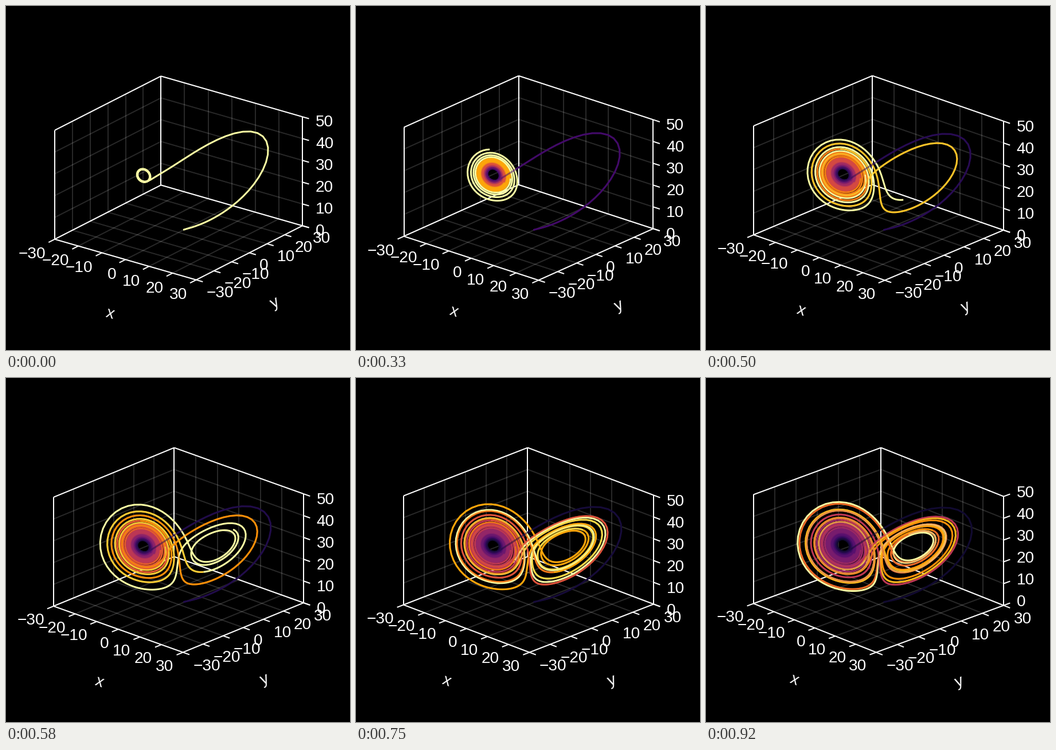
These frames come from a looping animation (600 px wide and 600 px high, 1000 ms). A matplotlib script:

```python
import numpy as np
import matplotlib.pyplot as plt
from matplotlib.animation import FuncAnimation
from matplotlib.collections import LineCollection

SIZE, DPI = 600, 100
PX = 72 / DPI  # points per pixel
LOOP_MS, TICK_MS = 1000, 10
TICKS = LOOP_MS // TICK_MS
POSES, STEPS = 12, 250
ELEVATION = np.pi / 8
SCALE = 0.9 * 2 * 268 / np.sqrt(1 + 1 + 4 / 9)
CENTER = np.array([301.0, 300.0])
XY_TICKS = range(-30, 31, 10)
Z_TICKS = range(0, 51, 10)
FONT = dict(family="Liberation Sans", size=28 * PX, color="white")
INFERNO = plt.get_cmap("inferno")


def lorenz_velocity(p, sigma=10, rho=28, beta=8 / 3):
    x, y, z = p
    return np.array([sigma * (y - x), x * (rho - z) - y, x * y - beta * z])


def lorenz(count, dt=0.01):
    """Runge-Kutta integration from (1, 1, 1)."""
    p = np.ones(3)
    points = []
    for _ in range(count):
        k1 = lorenz_velocity(p)
        k2 = lorenz_velocity(p + dt / 2 * k1)
        k3 = lorenz_velocity(p + dt / 2 * k2)
        k4 = lorenz_velocity(p + dt * k3)
        p = p + dt / 6 * (k1 + 2 * k2 + 2 * k3 + k4)
        points.append(p)
    return np.array(points)


def project(points, azimuth):
    """Orthographic view of the data box, in pixels with y pointing down."""
    p = np.asarray(points, float)
    x, y, z = p[..., 0] / 60, p[..., 1] / 60, (p[..., 2] - 25) / 75
    sin, cos = np.sin(azimuth), np.cos(azimuth)
    right = cos * y - sin * x
    up = np.cos(ELEVATION) * z - np.sin(ELEVATION) * (cos * x + sin * y)
    return CENTER + SCALE * np.stack([right, -up], axis=-1)


def unit(v):
    return v / np.hypot(*v)


def add_lines(segments, azimuth, **style):
    ax.add_collection(LineCollection(project(segments, azimuth), **style))


def grid_segments():
    segments = []
    for t in XY_TICKS:
        segments += [[(t, -30, 0), (t, 30, 0)], [(t, 30, 0), (t, 30, 50)],
                     [(-30, t, 0), (30, t, 0)], [(-30, t, 0), (-30, t, 50)]]
    for t in Z_TICKS:
        segments += [[(-30, 30, t), (30, 30, t)], [(-30, -30, t), (-30, 30, t)]]
    return segments


def spine_segments():
    segments = []
    for y, z in [(-30, 0), (30, 0), (30, 50)]:
        segments.append([(-30, y, z), (30, y, z)])
    for x, z in [(30, 0), (-30, 0), (-30, 50)]:
        segments.append([(x, -30, z), (x, 30, z)])
    for x, y in [(-30, -30), (-30, 30), (30, 30)]:
        segments.append([(x, y, 0), (x, y, 50)])
    return segments


def draw_ticks(values, place, direction, azimuth, pad, shift, ha):
    starts = project([place(v) for v in values], azimuth)
    marks = [(start, start + 12 * direction) for start in starts]
    ax.add_collection(LineCollection(marks, colors="white", linewidths=2 * PX))
    for value, start in zip(values, starts):
        x, y = start + pad * direction + shift
        ax.text(x, y, str(value).replace("-", "\u2212"), ha=ha, va="baseline", **FONT)


def draw_label(text, middle, along, azimuth):
    normal = np.array([-along[1], along[0]])
    x, y = project(middle, azimuth) + 105.5 * normal
    angle = -np.degrees(np.arctan2(along[1], along[0]))
    ax.text(x, y, text, rotation=angle, rotation_mode="anchor",
            ha="center", va="baseline", **FONT)


def draw_axes(azimuth):
    corner = project((-30, -30, 0), azimuth)
    x_dir = unit(project((30, -30, 0), azimuth) - corner)
    y_dir = unit(project((-30, 30, 0), azimuth) - corner)
    z_dir = x_dir if azimuth < 1.75 * np.pi else y_dir

    add_lines(grid_segments(), azimuth, colors=[(1, 1, 1, 0.16)], linewidths=2 * PX)
    add_lines(spine_segments(), azimuth, colors="white", linewidths=2 * PX)
    draw_ticks(XY_TICKS, lambda t: (t, -30, 0), -y_dir, azimuth, 18, (0.5, 25.5), "right")
    draw_ticks(XY_TICKS, lambda t: (30, t, 0), x_dir, azimuth, 18, (0.7, 25), "left")
    draw_ticks(Z_TICKS, lambda t: (30, 30, t), z_dir, azimuth, 24, (0, 10), "left")
    draw_label("x", (0, -30, 0), x_dir, azimuth)
    draw_label("y", (30, 0, 0), y_dir, azimuth)


def draw_curve(count, azimuth):
    path = project(TRAJECTORY[:count * STEPS], azimuth)

    def stroke(k, alpha, z):
        part = path[max(0, (k - 1) * STEPS - 1):k * STEPS]
        ax.plot(*part.T, color=INFERNO(k / count), lw=3 * PX, alpha=alpha,
                zorder=z, solid_capstyle="butt", solid_joinstyle="round")

    # A second pass in reverse order blends strands where they overlap.
    for k in range(1, count + 1):
        stroke(k, 1, 5 + k)
    for k in range(count - 1, 0, -1):
        stroke(k, 0.5, 40 - k)


def pose_at(tick):
    return int((tick + 0.5) * POSES / TICKS)


def update(tick):
    pose = pose_at(tick)
    if tick and pose == pose_at(tick - 1):
        return []
    count = pose + 1
    azimuth = 1.7 * np.pi + 0.3 * np.sin(2 * np.pi * count / 120)
    ax.clear()
    ax.set(xlim=(0, SIZE), ylim=(SIZE, 0))
    ax.axis("off")
    draw_axes(azimuth)
    draw_curve(count, azimuth)
    return []


TRAJECTORY = lorenz(POSES * STEPS)
fig = plt.figure(figsize=(SIZE / DPI, SIZE / DPI), dpi=DPI, facecolor="black")
ax = fig.add_axes([0, 0, 1, 1])
animation = FuncAnimation(fig, update, frames=TICKS, init_func=lambda: update(0),
                          interval=TICK_MS, repeat=True, repeat_delay=0)
plt.show()
```
